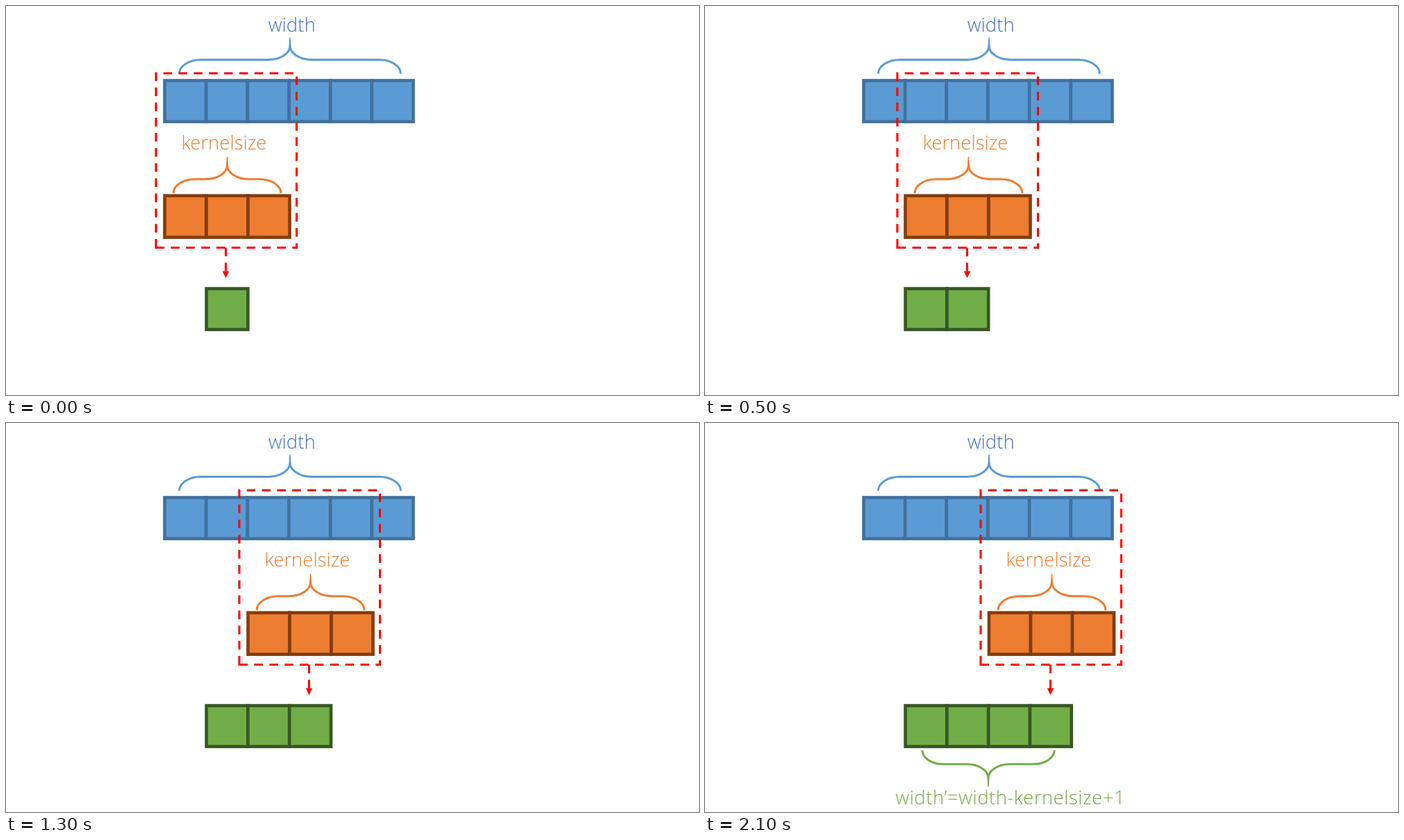
Animation of 998 by 561 pixels, one loop 2500 ms. Source, as an HTML page:

```html
<!DOCTYPE html>
<html lang="en">
<head>
<meta charset="utf-8">
<title>Sliding kernel</title>
<style>
  html, body { margin: 0; width: 100%; height: 100%; overflow: hidden; background: #fff; }
  svg { display: block; width: 100%; height: 100%; }
  text { font: 300 27.5px "Open Sans", "Noto Sans", sans-serif; text-anchor: middle; }
</style>
</head>
<body>
<svg viewBox="0 0 998 561">
  <g id="input"></g>
  <g id="output"></g>
  <g id="kernel"></g>
  <g id="label"></g>
  <g id="result"></g>
  <g id="frame" fill="none" stroke="#f00" stroke-width="3.1" stroke-dasharray="12.5 9.35">
    <path d="M216 348.5V97H418.5V348.5Z"/>
    <path d="M316.5 348.5V384"/>
    <path d="M311.7 382.5H321.3L316.5 392.3Z" fill="#f00" stroke="none"/>
  </g>
</svg>
<script>
const BLUE = "#5b9bd5", ORANGE = "#ed7d31", GREEN = "#70ad47";
const STEP = 500, LOOP = 2500;
const SHIFT = [0, 61, 120, 181];
const KERNEL_SHIFT = [0, 60, 120, 180.5];

const byId = id => document.getElementById(id);

function add(parent, tag, attrs, text = "") {
  const el = document.createElementNS("http://www.w3.org/2000/svg", tag);
  for (const key in attrs) el.setAttribute(key, attrs[key]);
  el.textContent = text;
  parent.append(el);
  return el;
}

function cells(parent, count, x, y, pitch, height, fill, stroke) {
  return Array.from({ length: count }, (_, i) => add(parent, "rect", {
    x: x + i * pitch, y, width: pitch, height, fill, stroke, "stroke-width": 4.6
  }));
}

// dir is -1 when the tip points up, 1 when it points down
function brace(parent, left, right, y, dir, color) {
  const mid = (left + right) / 2, rx = 31, ry = 20.3;
  const bar = y + dir * ry, tip = bar + dir * ry, end = tip + dir * 12;
  const bend = dir < 0 ? 1 : 0;
  const arc = (px, py, sweep) => `A${rx} ${ry} 0 0 ${sweep} ${px} ${py}`;
  add(parent, "path", {
    d: `M${left} ${y}` + arc(left + rx, bar, bend) + `H${mid - rx}` + arc(mid, tip, 1 - bend) +
       arc(mid + rx, bar, 1 - bend) + `H${right - rx}` + arc(right, y, bend),
    fill: "none", stroke: color, "stroke-width": 3, "stroke-linejoin": "bevel"
  });
  add(parent, "path", {
    d: `M${mid - 1.6} ${tip - dir}L${mid - 0.7} ${end}H${mid + 0.7}L${mid + 1.6} ${tip - dir}Z`,
    fill: color
  });
}

const input = byId("input"), kernel = byId("kernel"), label = byId("label"), result = byId("result");

cells(input, 6, 228.5, 107.5, 59.67, 59.3, BLUE, "#41719c");
brace(input, 249.5, 568.5, 97.8, -1, BLUE);
add(input, "text", { x: 411.7, y: 37, fill: "#4472c4" }, "width");

cells(kernel, 3, 228.5, 273.6, 60, 60, ORANGE, "#843c0c");
brace(label, 241, 396, 270, -1, ORANGE);
add(label, "text", { x: 314, y: 207, fill: ORANGE }, "kernelsize");

const outputs = cells(byId("output"), 4, 288.6, 407.6, 59.8, 59, GREEN, "#385723");
brace(result, 312.8, 503.2, 471.8, 1, GREEN);
add(result, "text", { x: 439.7, y: 550, fill: GREEN, "letter-spacing": 0.5 }, "width’=width-kernelsize+1");

function draw(time) {
  const step = Math.min(3, Math.floor(time % LOOP / STEP));
  const move = (id, dx) => byId(id).setAttribute("transform", `translate(${dx} 0)`);
  move("kernel", KERNEL_SHIFT[step]);
  move("label", SHIFT[step]);
  move("frame", SHIFT[step]);
  outputs.forEach((cell, i) => cell.setAttribute("visibility", i <= step ? "visible" : "hidden"));
  result.setAttribute("visibility", step === 3 ? "visible" : "hidden");
}

function tick() {
  draw(performance.now());
  requestAnimationFrame(tick);
}
tick();
</script>
</body>
</html>
```
